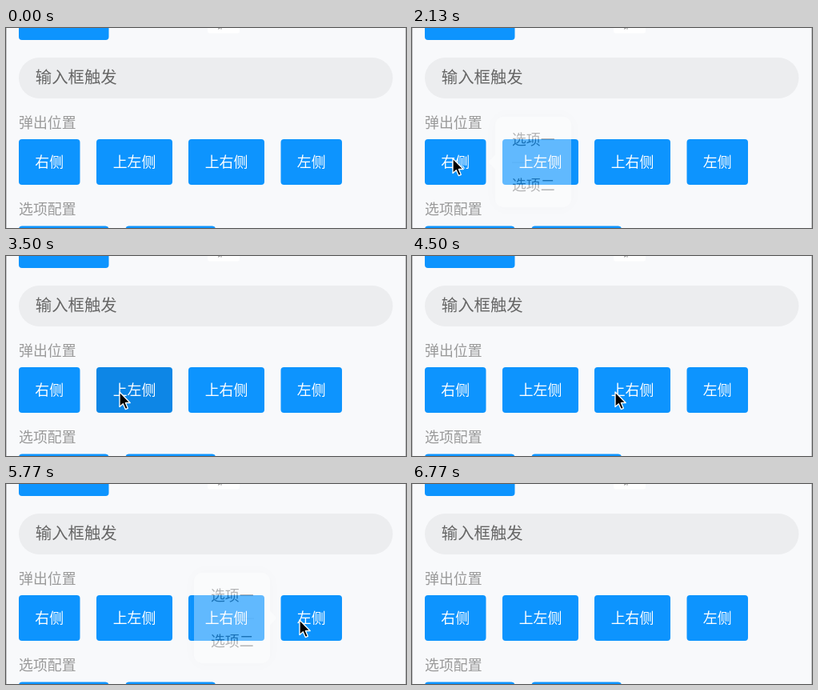
An HTML page that plays this animation: 500 by 250 pixels, repeating every 8060 ms.

```html
<!DOCTYPE html>
<html lang="zh-CN">
<head>
<meta charset="utf-8">
<title>气泡弹出框</title>
<style>
  html, body { margin: 0; width: 100%; height: 100%; overflow: hidden; background: #f8f9fb; }
  svg { display: block; width: 500px; height: 250px; font-family: "Noto Sans CJK SC", "Noto Sans CJK", sans-serif; }
  text { font-size: 17.9px; }
  .label { fill: #999; }
  .field { fill: #666; font-size: 20.4px; }
  .button text { fill: #fff; font-weight: 500; text-anchor: middle; }
  .popup text { fill: #333; text-anchor: middle; }
</style>
</head>
<body>
<svg id="stage" viewBox="0 0 500 250">
  <defs>
    <filter id="soft" x="-50%" y="-50%" width="200%" height="200%">
      <feGaussianBlur stdDeviation="10"/>
    </filter>
  </defs>
  <rect width="500" height="250" fill="#f8f9fb"/>
  <rect x="252" y="-10" width="40" height="16.5" rx="3" fill="#fff"/>
  <path d="M265 1.2L267.5 .2M269 0V1.6" stroke="#888" fill="none"/>
  <rect x="16" y="37" width="467.5" height="51" rx="25.5" fill="#ecedef"/>
  <text class="field" x="36.8" y="69">输入框触发</text>
  <text class="label" x="16" y="124.8">弹出位置</text>
  <text class="label" x="16" y="233">选项配置</text>
  <g id="buttons"></g>
  <g id="popups"></g>
  <path d="M.5 0V250M499.5 0V250" stroke="#c2c3c5"/>
  <path id="cursor" d="M0 0V18.6L4.3 14.7L7.3 21.6L10.3 20.3L7.4 13.5H13.2Z"
        fill="#000" stroke="#fff" stroke-width="1.3" stroke-linejoin="round"/>
</svg>
<script>
const LOOP = 8060;
const BLUE = '#0d94fe', PRESSED = '#0d86e6';
const POP_W = 95, POP_H = 113;
const NS = 'http://www.w3.org/2000/svg';
const byId = id => document.getElementById(id);

function add(parent, tag, attrs, text) {
  const el = document.createElementNS(NS, tag);
  for (const key in attrs) el.setAttribute(key, attrs[key]);
  if (text) el.textContent = text;
  return parent.appendChild(el);
}

function addButton(x, y, width, label) {
  const g = add(byId('buttons'), 'g', { class: 'button' });
  const rect = add(g, 'rect', { x, y, width, height: 57, rx: 4, fill: BLUE });
  if (label) add(g, 'text', { x: x + width / 2, y: y + 34.8 }, label);
  return rect;
}

// Arrow drawn pointing right from its base, then turned to face the button.
function addPopup({ x, y, arrow: [ax, ay, turn] }) {
  const g = add(byId('popups'), 'g', { class: 'popup', transform: `translate(${x} ${y})` });
  const box = { width: POP_W, height: POP_H, rx: 10 };
  add(g, 'rect', { ...box, fill: '#000', opacity: 0.065, filter: 'url(#soft)' });
  add(g, 'rect', { ...box, fill: '#fff' });
  add(g, 'path', {
    d: 'M-1 -10L0 -9L7 -1.6Q8.6 0 7 1.6L0 9L-1 10Z',
    fill: '#fff', transform: `translate(${ax} ${ay}) rotate(${turn})`
  });
  add(g, 'rect', { x: 21, y: 56.5, width: 54, height: 1, fill: '#e9eaec' });
  add(g, 'text', { x: POP_W / 2 + 0.3, y: 34.6 }, '选项一');
  add(g, 'text', { x: POP_W / 2 + 0.3, y: 91.6 }, '选项二');
  return g;
}

addButton(16, -42, 112.5);
addButton(16, 247.5, 112.5);
addButton(149.5, 247.5, 112.5);
const buttons = [
  addButton(16, 139, 76.5, '右侧'),
  addButton(113, 139, 95, '上左侧'),
  addButton(228, 139, 95, '上右侧'),
  addButton(343.5, 139, 76.5, '左侧')
];

const toLeft = [0, 56.5, 180], toRight = [POP_W, 56.5, 0], toDown = [POP_W / 2, POP_H, 90];
const popups = [
  { x: 104, y: 111, arrow: toLeft, show: 2095, hide: 2990 },
  { x: 113, y: 13, arrow: toDown, show: 3600, hide: 4120 },
  { x: 228, y: 13, arrow: toDown, show: 4630, hide: 5190 },
  { x: 235, y: 111, arrow: toRight, show: 5735, hide: 6020 }
].map(p => ({ ...p, el: addPopup(p) }));

const presses = [
  { button: 1, from: 3480, to: 3600 },
  { button: 3, from: 5670, to: 5740 }
];

const smooth = u => u * u * (3 - 2 * u);
const easeIn = u => u * u;
const easeOut = u => 1 - (1 - u) ** 3;
const progress = (t, from, length) => Math.min(1, Math.max(0, (t - from) / length));

const START = [503, 20];
const moves = [
  { from: 690, to: 1530, at: [100, 155], ease: smooth },
  { from: 1550, to: 1770, at: [51, 163], ease: smooth },
  { from: 3090, to: 3470, at: [142, 170], ease: smooth },
  { from: 4220, to: 4470, at: [254, 170], ease: smooth },
  { from: 4640, to: 5000, at: [278, 170], ease: smooth },
  { from: 5290, to: 5650, at: [367, 170], ease: smooth },
  { from: 6110, to: 6770, at: [504, 122], ease: easeIn }
];

function cursorAt(t) {
  let [x, y] = START;
  for (const m of moves) {
    const k = m.ease(progress(t, m.from, m.to - m.from));
    x += (m.at[0] - x) * k;
    y += (m.at[1] - y) * k;
  }
  return [x, y];
}

function render(t) {
  for (const p of popups) {
    const alpha = easeOut(progress(t, p.show, 275)) * (1 - progress(t, p.hide, 75));
    p.el.setAttribute('opacity', alpha);
    p.el.setAttribute('visibility', alpha > 0 ? 'visible' : 'hidden');
  }
  buttons.forEach((rect, i) => {
    const down = presses.some(p => p.button === i && t >= p.from && t < p.to);
    rect.setAttribute('fill', down ? PRESSED : BLUE);
  });
  byId('cursor').setAttribute('transform', `translate(${cursorAt(t).join(' ')})`);
}

const begin = performance.now();
function tick() {
  render((performance.now() - begin) % LOOP);
  requestAnimationFrame(tick);
}
tick();
</script>
</body>
</html>
```
